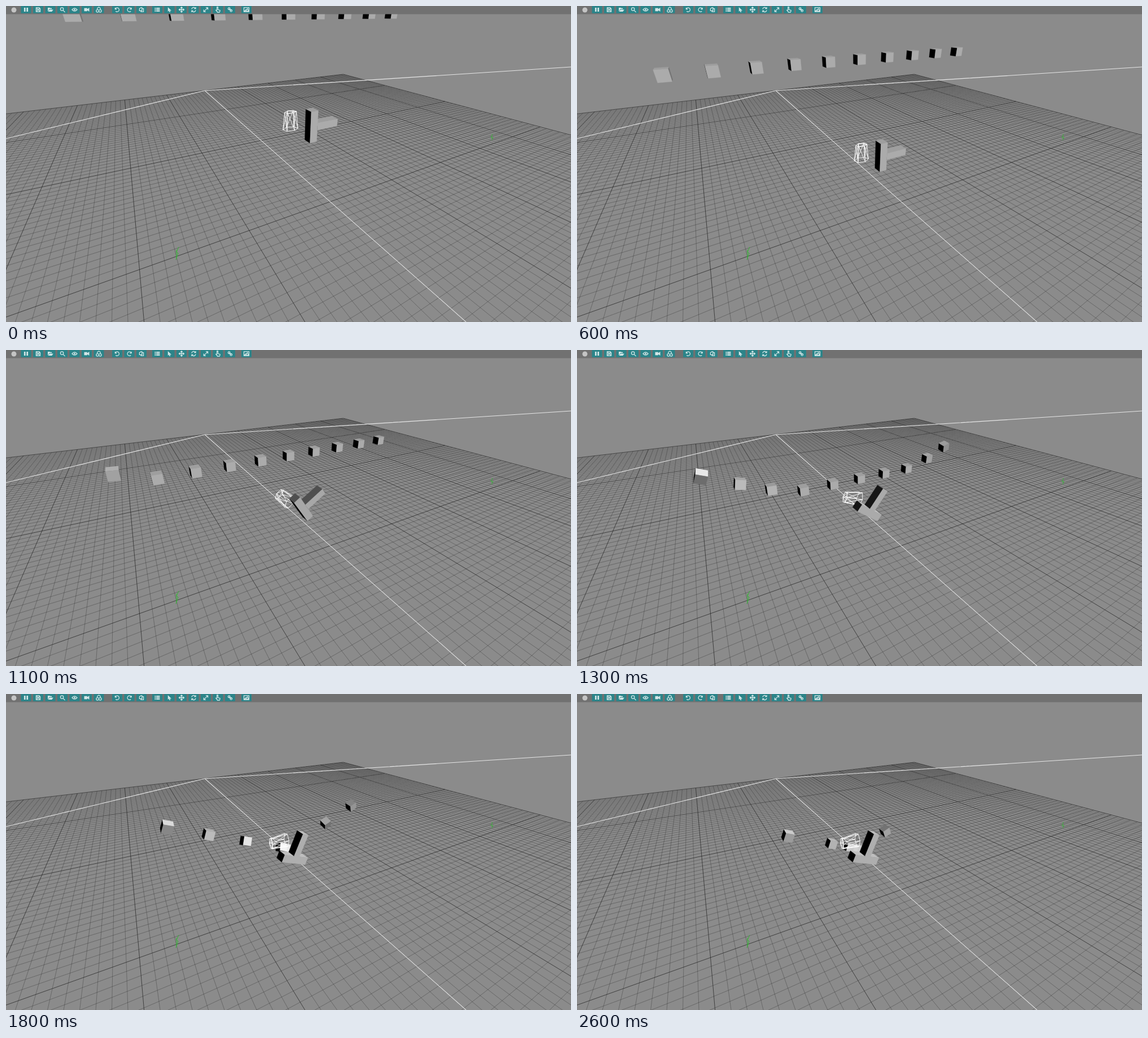
An HTML page for the animation above (2.7 s loop, 1001 by 560 pixels).

```html
<!DOCTYPE html>
<html lang="en">
<head>
<meta charset="utf-8">
<title>Falling boxes</title>
<style>
html, body { margin: 0; width: 100%; height: 100%; overflow: hidden; background: #8b8b8b; }
svg { display: block; width: 100%; height: 100%; }
.line { fill: none; stroke-linejoin: round; }
.icon { fill: none; stroke: #d3e6e7; stroke-width: 1.4; }
.solid { fill: #d3e6e7; stroke: none; }
</style>
</head>
<body>
<svg viewBox="0 0 1001 560" preserveAspectRatio="none">
  <rect width="1001" height="560" fill="#8b8b8b"/>
  <path id="minor" class="line" stroke="#1c1c1c" stroke-opacity=".52" stroke-width=".6"/>
  <path id="major" class="line" stroke="#222" stroke-opacity=".8" stroke-width=".9"/>
  <path class="line" stroke="#e6e6e6" stroke-width="1.1" d="M0 235L352 150L1001 108M352 150L815 560"/>
  <path class="line" stroke="#36b436" stroke-width="1" d="M306 427L302 436L305 438L301 450M302 432V447M862 227L859 233H863L860 238"/>
  <g id="scene"></g>
  <rect width="1001" height="14.5" fill="#717171"/>
  <circle cx="14" cy="7" r="4.5" fill="#c4c4c4"/>
  <g id="bar"></g>
</svg>
<script>
const $ = id => document.getElementById(id);
const LOOP = 2700, STEP = 100;
const FOCAL = 485, CX = 500.5, CY = 280, DIST = 1.804;
const SP = 0.4808, CP = 0.8768;        // camera pitch
const SY = 0.481, CYAW = 0.877;        // camera yaw
const EYE = [-DIST * SY, 1, DIST * CYAW];
const LIGHT = [0.45, 0.62, 0.67];
const RAD = Math.PI / 180;
const mix = (a, b, p) => a + (b - a) * p;
const clamp = v => Math.min(1, Math.max(0, v));
const add = (a, b) => a.map((v, i) => v + b[i]);
const dot = (a, b) => a.reduce((s, v, i) => s + v * b[i], 0);

// World points are [right, up, toward the viewer].
const depthOf = ([r, h, a]) => (DIST + SY * r - CYAW * a) * CP + (1 - h) * SP;

function project(point) {
  const [r, h, a] = point, depth = depthOf(point);
  const x = CYAW * r + SY * a, z = DIST + SY * r - CYAW * a;
  return [CX + FOCAL * x / depth, CY + FOCAL * ((1 - h) * CP - z * SP) / depth];
}

const path = pts => 'M' + pts.map(p => project(p).map(v => v.toFixed(1)).join(' ')).join('L');

// Ground line, with an end behind the camera pulled back to just before it.
function groundLine(p, q) {
  const near = 0.08, dp = depthOf(p), dq = depthOf(q);
  if (dp < near && dq < near) return '';
  const cut = (from, to, df, dt) => from.map((v, i) => mix(v, to[i], (df - near) / (df - dt)));
  if (dq < near) q = cut(p, q, dp, dq);
  else if (dp < near) p = cut(q, p, dq, dp);
  return path([p, q]);
}

function drawGrid() {
  const half = 2.61, cell = half / 50, d = { minor: '', major: '' };
  for (let i = -50; i <= 50; i++) {
    const c = i * cell;
    d[i % 10 ? 'minor' : 'major'] += groundLine([c, 0, -half], [c, 0, half]);
    d[Math.abs(i % 20) === 10 ? 'major' : 'minor'] += groundLine([half, 0, c], [-half, 0, c]);
  }
  for (const id in d) $(id).setAttribute('d', d[id]);
}

function turn([x, y, z], pitch, roll) {
  const sp = Math.sin(pitch * RAD), cp = Math.cos(pitch * RAD);
  const sr = Math.sin(roll * RAD), cr = Math.cos(roll * RAD);
  const y2 = y * cp + z * sp, z2 = z * cp - y * sp;
  return [x * cr - y2 * sr, x * sr + y2 * cr, z2];
}

function shade(n) {
  const v = Math.round(255 * clamp(dot(n, LIGHT)));
  return `rgb(${v},${v},${v})`;
}

function box(centre, half, pitch, roll, shift = [0, 0, 0]) {
  const at = p => add(centre, turn(add(p, shift), pitch, roll));
  let out = '';
  for (let axis = 0; axis < 3; axis++) for (const sign of [-1, 1]) {
    const normal = [0, 0, 0];
    normal[axis] = sign;
    const n = turn(normal, pitch, roll);
    const mid = at(normal.map((v, i) => v * half[i]));
    if (dot(n, EYE) <= dot(n, mid)) continue;
    const u = (axis + 1) % 3, w = (axis + 2) % 3;
    const corners = [[-1, -1], [1, -1], [1, 1], [-1, 1]].map(([p, q]) => {
      const c = [0, 0, 0];
      c[axis] = sign * half[axis];
      c[u] = p * half[u];
      c[w] = q * half[w];
      return at(c);
    });
    const fill = shade(n);
    out += `<path d="${path(corners)}Z" fill="${fill}" stroke="${fill}" stroke-width=".3"/>`;
  }
  return out;
}

const fall = (from, t) => from - 0.27 * t - 0.235 * t * t;

// Tipping over after the first impact, from 0 to 1.
function tip(t) {
  const p = clamp(t - 0.6);
  return p * p * (3 - 2 * p);
}

// Each cube drops onto a shallow V, tumbles and slides to the middle.
const COUNT = 10, GAP = 0.2067, SLOPE = 0.43, SLOPE_ANGLE = 23;

function cubePose(i, t) {
  const n = i - 5, rank = Math.abs(n), side = Math.sign(n), r0 = rank * GAP;
  const hitHeight = Math.max(0.04, SLOPE * r0);
  const landing = (Math.sqrt(0.27 ** 2 + 4 * 0.235 * (1 - hitHeight)) - 0.27) / (2 * 0.235);
  const since = t - landing;
  if (since < 0) return { centre: [side * r0, fall(1, t), 0], pitch: 0, roll: 0 };
  const r = Math.max(0.03 * rank, r0 - 1.7 / (rank || 1) * since);
  const settle = clamp(since / 0.2);
  return {
    centre: [side * r, 0.04 + SLOPE * r, 0],
    pitch: 45 * Math.sin(0.7 * (i - 0.7)) * settle * Math.exp(-since),
    roll: side * SLOPE_ANGLE * settle
  };
}

function drawCubes(t) {
  const size = [0.0285, 0.0285, 0.0285];
  return Array.from({ length: COUNT }, (_, i) => cubePose(i, t))
    .sort((a, b) => depthOf(b.centre) - depthOf(a.centre))
    .map(c => box(c.centre, size, c.pitch, c.roll)).join('');
}

function drawTee(t) {
  const p = tip(t), roll = 66 * p, pitch = -6 * p;
  const c = [0.191 - 0.155 * p, Math.max(fall(0.281, t), 0.02 - 0.07 * p), 0];
  const post = box(c, [0.03, 0.12, 0.036], pitch, roll);
  const arm = box(c, [0.09, 0.028, 0.036], pitch, roll, [0.12, 0, 0]);
  const armInFront = dot(turn([1, 0, 0], pitch, roll), EYE) > 0;
  return armInFront ? post + arm : arm + post;
}

function drawCage(t) {
  const p = tip(t), n = 6;
  const c = [0.016 - 0.095 * p, Math.max(fall(0.35, t), 0.085 + 0.03 * p), 0];
  const ring = (r, h) => Array.from({ length: n }, (_, i) => {
    const a = (i + 0.3) * 2 * Math.PI / n;
    return add(c, turn([r * Math.cos(a), h, 0.7 * r * Math.sin(a)], 0, 90 * p));
  });
  const top = ring(0.043, 0.062), low = ring(0.056, -0.062);
  let d = path(top) + 'Z' + path(low) + 'Z' + path([top[0], top[2], top[4], top[0]]);
  for (let i = 0; i < n; i++) d += path([top[i], low[i], top[(i + 1) % n]]);
  return `<path class="line" d="${d}" stroke="#fff" stroke-width=".9"/>`;
}

// Icon shapes sit in a box from -5 to 5; a leading * means filled.
const PITCH = 21.5;
const GROUPS = {
  35.5: [
    '*M-4 -4H-1V4H-4ZM1 -4H4V4H1Z',
    'M-4 -4H2L4 -2V4H-4ZM-2 -4V-1H2V-4M-2 4V1H2V4',
    '*M-5 4V-4H-1L0 -3H3V-1H-2ZM-4 4L-2 0H6L3 4Z',
    'M2 -1A3 3 0 1 1 -4 -1A3 3 0 1 1 2 -1M1 1L5 5',
    'M-5 0Q0 -6 5 0Q0 6 -5 0ZM-1 0A1 1 0 1 1 1 0A1 1 0 1 1 -1 0',
    '*M-5 -3H1V-1L5 -4V4L1 1V3H-5Z',
    'M0 -5L3 -3V0L0 1L-3 0V-3ZM-3 0L-5 1V4L-3 5L0 4V1M3 0L5 1V4L3 5L0 4'
  ],
  197: [
    'M-4 -4V-1H-1M-4 -1A4 4 0 1 1 -3 3',
    'M4 -4V-1H1M4 -1A4 4 0 1 0 3 3',
    'M-4 -2L-1 -4H1V2H-4ZM1 -2H4V4H-1V2'
  ],
  268: [
    '*M-5 -4H-3V-2H-5ZM-2 -4H5V-2H-2ZM-5 -1H-3V1H-5ZM-2 -1H5V1H-2ZM-5 2H-3V4H-5ZM-2 2H5V4H-2Z',
    '*M-3 -5L4 2H1L2 5L0 5L-1 2L-3 4Z',
    'M-5 0H5M0 -5V5M-3 -2L-5 0L-3 2M3 -2L5 0L3 2M-2 -3L0 -5L2 -3M-2 3L0 5L2 3',
    'M-4 -1A4 4 0 0 1 3 -3M4 -5V-2H1M4 1A4 4 0 0 1 -3 3M-4 5V2H-1',
    'M-4 4L4 -4M0 -4H4V0M-4 0V4H0',
    'M-2 1V-5H0V0L4 1V3L3 5H-1L-4 1H-2',
    'M0 -2A2 2 0 1 0 -2 0A2 2 0 0 0 0 -2M0 2A2 2 0 1 0 2 0A2 2 0 0 0 0 2M-2 -2L2 2'
  ],
  426: ['M-5 -4H5V4H-5ZM-4 3L-1 0L0 1L2 -2L4 2V3Z']
};

function drawBar() {
  const button = (x, d) =>
    `<g transform="translate(${x} 6.5)"><rect x="-9" y="-6.5" width="18" height="13" rx="1" fill="#2c8489"/>` +
    `<path class="${d[0] === '*' ? 'solid' : 'icon'}" d="${d.replace('*', '')}" transform="scale(.9)"/></g>`;
  $('bar').innerHTML = Object.entries(GROUPS)
    .flatMap(([x, shapes]) => shapes.map((d, k) => button(+x + k * PITCH, d))).join('');
}

function frame(now) {
  const t = Math.floor(now % LOOP / STEP) * STEP / 1000;
  $('scene').innerHTML = drawCubes(t) + drawCage(t) + drawTee(t);
  requestAnimationFrame(frame);
}

drawGrid();
drawBar();
frame(performance.now());
</script>
</body>
</html>
```
